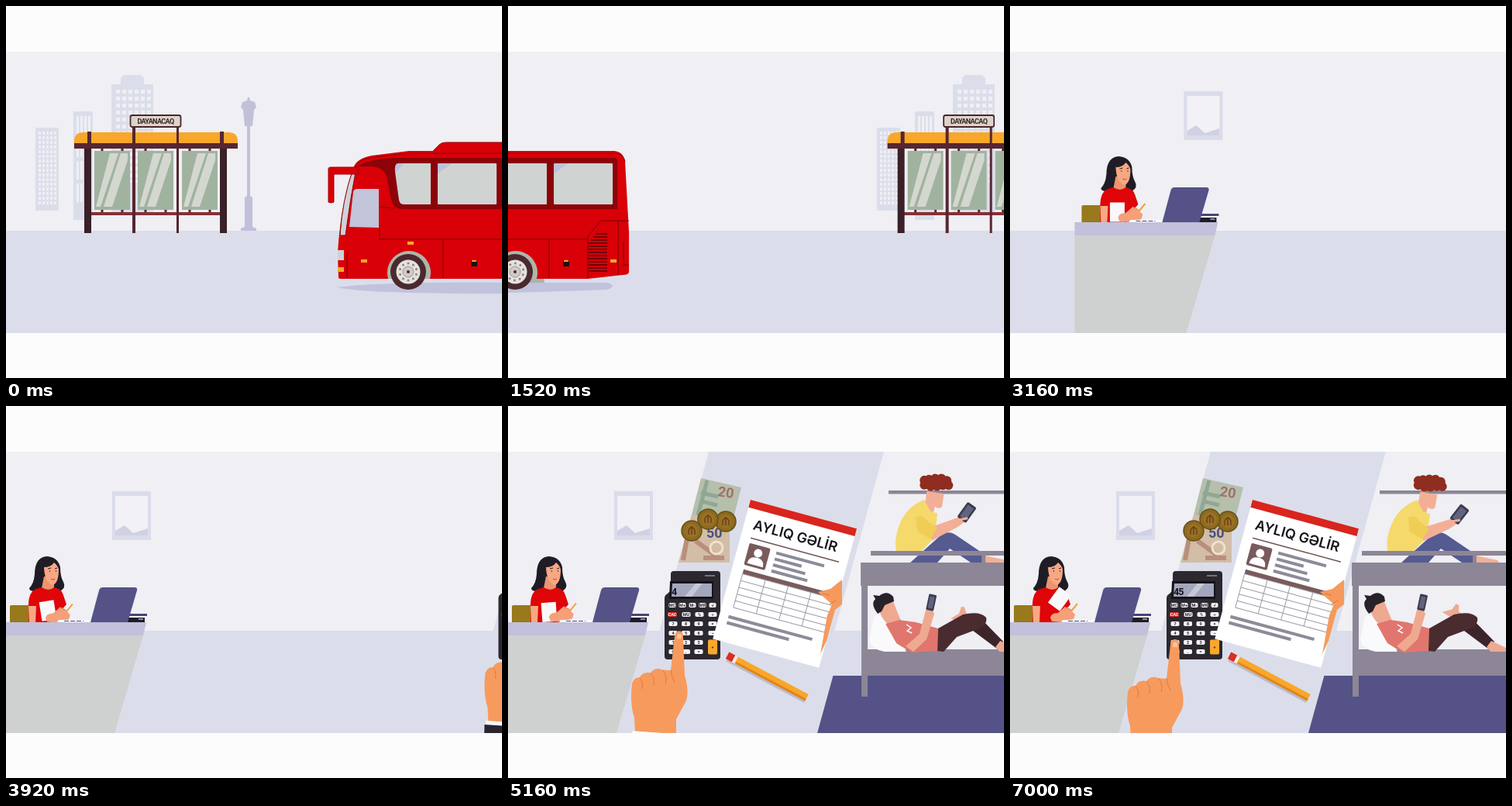
These frames come from a looping animation (640x480 px, 7040 ms). An HTML page:

```html
<!DOCTYPE html>
<html lang="az">
<head>
<meta charset="utf-8">
<style>
html, body { margin: 0; width: 100%; height: 100%; overflow: hidden; background: #fcfcfc; }
svg { display: block; width: 640px; height: 480px; }
text { font-family: Roboto, "Liberation Sans", sans-serif; font-weight: 700; }
</style>
</head>
<body>
<svg viewBox="0 0 640 480" xmlns="http://www.w3.org/2000/svg">
  <defs>
    <clipPath id="stage"><rect y="59" width="640" height="363"/></clipPath>
    <clipPath id="aboveSill"><rect y="300" width="640" height="52"/></clipPath>
    <pattern id="dots" x="42" y="162" width="5" height="6" patternUnits="userSpaceOnUse"><rect width="3" height="4" fill="#efeff4"/></pattern>
    <pattern id="panes" x="142" y="108" width="8" height="9" patternUnits="userSpaceOnUse"><rect width="5" height="5" fill="#efeff4"/></pattern>
    <pattern id="slits" x="91" y="142" width="5" height="29" patternUnits="userSpaceOnUse"><rect width="3" height="24" fill="#efeff4"/></pattern>
    <linearGradient id="glass" x2="1" y2="1"><stop offset=".12" stop-color="#bfc1da"/><stop offset=".13" stop-color="#cfd3d2"/></linearGradient>
  </defs>

  <g clip-path="url(#stage)">
    <rect y="59" width="640" height="231" fill="#efeff4"/>
    <rect y="290" width="640" height="132" fill="#dbdeea"/>

    <g id="street">
      <g id="city" fill="#dbdeea">
        <path d="M38 157h30v107h-30zM87 136h25v140h-25zM136 101h12v-8l4-4h22l4 4v8h12v165h-54z"/>
        <rect x="42" y="162" width="23" height="96" fill="url(#dots)"/>
        <rect x="91" y="142" width="18" height="112" fill="url(#slits)"/>
        <rect x="142" y="108" width="45" height="120" fill="url(#panes)"/>
      </g>
      <g id="stop">
        <g id="panels"></g>
        <path d="M108 266h170v4h-170z" fill="#853036"/>
        <path d="M88 179v-6q1-10 11-10h189q10 0 11 10v6z" fill="#f9a72b"/>
        <path d="M88 177h211v7h-211zM105 162h5v18h-5zM276 162h5v18h-5zM163 157h4v136h-4zM220 157h3v136h-3z" fill="#572630"/>
        <path d="M101 184h9v109h-9zM276 184h9v109h-9z" fill="#3a2028"/>
        <rect x="160.500" y="141" width="65" height="15" rx="2.500" fill="#dbd4c8" stroke="#4c252d" stroke-width="1.800"/>
        <text x="193" y="152" font-size="9" letter-spacing="-.6" text-anchor="middle" fill="#3a2028">DAYANACAQ</text>
      </g>
      <path id="lamp" fill="#c0c0da" d="M311 122l1-4h2l1 4 6 2 2 7-3 3-2 21h-3v90l3 2v38l5 2v3h-20v-3l5-2v-38l3-2v-90h-3l-2-21-3-3 2-7z"/>
      <g id="bus">
        <path d="M52 363Q110 355 300 357H505Q519 361 505 366Q310 374 150 370Q70 368 52 363Z" fill="#c1c2dc"/>
        <path d="M394 357h30l-3-15h-30z" fill="#aab3aa"/>
        <path d="M175 188l9-9q3-3 9-3h92q5 0 7 4l3 8z" fill="#d90007" stroke="#8b0409"/>
        <path d="M54 350L53 318Q57 255 73 209Q78 196 97 193L145 187H514Q526 188 528 201L533 292V343Q533 347 525 347L480 352H58Q54 352 54 350Z" fill="#d90007"/>
        <path d="M75 207Q82 197 100 195L145 190H515Q526 190 528 201" fill="none" stroke="#8b0409"/>
        <path d="M78 207Q95 196 135 196H514Q518 196 518 200V262H137Q125 262 122 250L116 220Q113 209 98 207Z" fill="#8b0409"/>
        <path d="M107 259l20 2" stroke="#8b0409"/>
        <path d="M131 203h42v53h-35q-5 0-6-6l-5-36q-1-11 4-11z" fill="url(#glass)"/>
        <g id="windows"></g>
        <path d="M56 296Q59 250 72 213L77 209Q69 250 63 296Z" fill="#cfd2d8" stroke="#8b0409"/>
        <path d="M68 285l5-45q1-4 5-4h28v50z" fill="#c3c5da"/>
        <path d="M41 210q0-2 3-2h36v9H48v36q-4 2-7 0z" fill="#d90007" stroke="#a30308"/>
        <path d="M107 288v13H480V297L497 277H533M65 318V351M189 301V351M269 301V351M349 301V351M430 301V351M480 301V351M519 277V347M526 305V334H533" fill="none" stroke="#700407"/>
        <path id="grille" stroke="#700407" stroke-width="2"/>
        <path d="M53 315h8v13h-8z" fill="#cfd2d8"/>
        <path d="M53 337h8v6h-8zM143 304h8v4h-8zM83 327h8v4h-8zM509 327h8v4h-8z" fill="#f9a72b"/>
        <path d="M225 328h8v8h-8zM305 328h8v8h-8zM448 328h8v8h-8z" fill="#1c1012"/>
        <path d="M226 328h6v2h-6zM306 328h6v2h-6zM449 328h6v2h-6z" fill="#f9a72b"/>
        <g id="wheels"></g>
      </g>
    </g>

    <g id="office">
      <path d="M224 110h50v63h-50z" fill="#dbdcea"/>
      <path d="M228 116h42v51h-42z" fill="#f1f1f6"/>
      <path d="M228 161l12-7 11 10 19-6v9h-42z" fill="#d0d1e4"/>
      <rect x="92" y="257" width="25" height="26" rx="2" fill="#98791b"/>
      <path d="M117 235Q123 229 124 217Q124 195 140 194Q154 195 157 208Q157 220 161 227Q165 234 157 239H124Q117 239 117 235Z" fill="#201c25"/>
      <path d="M136 220h13v14l-6 6-10-5z" fill="#ec946d"/>
      <path d="M136 208q9 0 13-6 5 4 6 9 0 18-8 20-10-3-11-23z" fill="#f8a783"/>
      <path d="M141 210l4-1M150 210l3-1" stroke="#201c25"/>
      <path d="M143 213h1M151 213h1" stroke="#201c25" stroke-width="1.600"/>
      <path d="M145 223q3 2 5 0" stroke="#d33932" fill="none"/>
      <path d="M116 262Q115 240 126 236l7-2q9 6 16 0 10 2 12 10l4 12-8 9v15h-41z" fill="#df0509"/>
      <path d="M116 258h10l-1 22h-8z" fill="#f8a783"/>
      <rect id="note" x="-9.500" y="-12.500" width="19" height="25" fill="#f8f8fb"/>
      <g id="pen">
        <path d="M160 272l14-17" stroke="#f3a03d" stroke-width="2"/>
        <path d="M139 273q1-6 10-6l9-8q6 2 8 5l5 5-2 6-16 4-12-1z" fill="#f5a078"/>
        <path d="M158 260l8 3" stroke="#dc805c"/>
      </g>
      <path d="M155 276h42v3h-44z" fill="#fff"/>
      <path d="M162 277.500h25" stroke="#44426d" stroke-dasharray="6 2"/>
      <path d="M245 268h24v3h-24z" fill="#47457a"/>
      <path d="M240 273h26v6h-26z" fill="#1f1c29"/>
      <path d="M247 272h21M258 275h6" stroke="#fff"/>
      <path d="M196 279l11-41q1-4 5-4h41q4 0 3 4l-12 41z" fill="#555287"/>
      <path d="M83 279h185l-4 17H83z" fill="#c2c0db"/>
      <path d="M83 296h181l-37 126H83z" fill="#ced1cf"/>
    </g>

    <g id="income">
      <path d="M259 59H485L385 422H159Z" fill="#dbdeea"/>
      <g id="money">
        <path d="M249 93l52 12-12 47-52-11z" fill="#b5bfac"/>
        <path d="M257 96l-12 45M249 112l22 5M250 123l20 5" stroke="#8fa894" stroke-width="5"/>
        <text transform="translate(270 116) rotate(9)" font-size="18" fill="#a36e67">20</text>
        <path d="M237 140l49 14v48h-66z" fill="#d2bda7"/>
        <path d="M232 165l-6 34M242 174l30 22M252 196h27" stroke="#b98f7b" stroke-width="6"/>
        <circle cx="269" cy="183" r="8" fill="none" stroke="#efe2cc" stroke-width="3"/>
        <text x="256" y="170" font-size="18" fill="#4b527f">50</text>
        <g id="coins"></g>
      </g>
      <path d="M214 213h56q4 0 4 4v106q0 4-4 4h-64q-4 0-4-4v-75q0-4 4-6l4-4v-21q0-4 4-4z" fill="#2c2830"/>
      <path d="M209 226h56v23h-57z" fill="#151319"/>
      <path d="M212 229h51v17h-52z" fill="#a3a7bd"/>
      <path d="M242 229h9l-14 17h-9z" fill="#c5c8d6"/>
      <path d="M254 219h13" stroke="#77727b" stroke-width="2"/>
      <text id="digits" x="211" y="244" font-size="12.500" letter-spacing="-1" fill="#17151c"></text>
      <g id="keys"></g>

      <g transform="translate(313 121) rotate(15.2)">
        <rect width="142" height="186" fill="#fff"/>
        <rect width="142" height="10" fill="#d8251d"/>
        <text x="12" y="36" font-size="18" style="font-family:Inter,sans-serif;font-weight:600" fill="#17151c">AYLIQ GƏLİR</text>
        <path d="M13 47.500h118" stroke="#725659" stroke-width="1.600"/>
        <rect x="13.500" y="54" width="28" height="29" rx="2" fill="#795b5c"/>
        <circle cx="27.500" cy="64" r="5.500" fill="#fff"/>
        <path d="M17 80q0-10 10.500-10T38 80z" fill="#fff"/>
        <path d="M50 57.500h64M50 65.500h36M50 73.500h43M50 81.500h48M12 153h112M12 161h83" stroke="#8d8b99" stroke-width="4"/>
        <path d="M15 89h122v6H15z" fill="#795b5c"/>
        <path id="table" fill="none" stroke="#9b9ba9"/>
      </g>
      <path d="M400 240l16-4 15-12v32l-9 7-11 40-8 17 9-50 6-14-9-8z" fill="#f59a5c"/>
      <path d="M406 242l9 2M415 256l8-5" stroke="#d9783f"/>
      <g transform="translate(285 322.500) rotate(28)">
        <path d="M0 4h114v4H0z" fill="#b9bccf"/>
        <path d="M0-4.500h114v9.500H0z" fill="#f9a72b"/>
        <path d="M12 2h102v3H12z" fill="#df861d"/>
        <path d="M-2-4.500h9v9.500h-9z" fill="#dc2b23"/>
        <path d="M7-4.500h4v9.500h-4z" fill="#f1eeee"/>
      </g>
      <g id="hand">
        <path d="M-6 5Q-5-2 0-2Q5-2 5 5L7 55Q13 75 9 88L-4 112V130H-57L-58 110Q-64 92-61 66Q-58 57-51 58Q-47 50-37 52Q-31 44-22 48L-11 49Z" fill="#f79a5e"/>
        <path d="M-51 59q5 5 3 14M-37 53q6 5 4 15M-21 49q6 8 3 17M-11 48q1 10 5 16" fill="none" stroke="#dd7b40"/>
        <path d="M-3 3q3-3 6 0v5h-6z" fill="#fac39c"/>
        <path d="M-60 127l57 4v6l-58-4z" fill="#fff"/>
        <path d="M-62 132l59 4v50h-60z" fill="#292630"/>
      </g>
    </g>

    <g id="dorm">
      <path d="M485 59H900V290H421.400Z" fill="#efeff4"/>
      <path d="M421.400 290H900V348H405.400Z" fill="#dbdeea"/>
      <path d="M442 232h435v84H442z" fill="#efeff4"/>
      <path d="M405.400 348H900V422H385Z" fill="#555287"/>
      <path d="M477 109h400v4.500H477z" fill="#8c8696"/>
      <path d="M505 202l39-35q11-8 22 1l34 23v11h-17l-27-18-16 18z" fill="#555a91"/>
      <path d="M601 193l28 6q4 3-1 4h-28z" fill="#f3af96"/>
      <g id="reader">
        <path d="M528 110l22 4-3 17q-6 3-9-1l-3 11-12-4z" fill="#f3af96"/>
        <path d="M524 121Q501 130 492 152Q483 174 488 191l27 1 22-22 4-31-9-3z" fill="#f5d96b"/>
        <path d="M531 157l36-12 8-3 6 5-14 10-34 17z" fill="#f3af96"/>
        <path d="M513 144q8-5 13 3l14 11-8 14-17-10z" fill="#f0cd55"/>
        <g transform="translate(579 138.500) rotate(37)">
          <rect x="-7" y="-12" width="14" height="24" rx="2" fill="#3c3b50"/>
          <rect x="-4.500" y="-9" width="9" height="18" fill="#62647d"/>
        </g>
        <path d="M568 148l12-2" stroke="#f3af96" stroke-width="3"/>
        <path id="curls" fill="#8e2d20"/>
      </g>
      <path d="M454 187h423v6H454zM441 202h436v30H441zM442 202h8v173h-8zM442 314h435v34H442zM597 187h5v16h-5z" fill="#8c8696"/>
      <path d="M458 272q4-4 9 0l25 30 8 15h-28q-17-3-20-15z" fill="#fafafd"/>
      <g transform="translate(3 1)">
        <path d="M461 260l18-11 6 15 5 12-14 6q-10-5-15-22z" fill="#eeaa90"/>
        <path d="M460 267q-10-13-3-19l-3-5 8 1q10-8 18 1l1 6-12 5-4 8z" fill="#27222a"/>
      </g>
      <path d="M473 281l18-5 21 3 29 8v29l-35 2-19-12z" fill="#e1766e"/>
      <path d="M500 282l6 4-5 4 6 3" fill="none" stroke="#fff" stroke-width="1.500"/>
      <path d="M499 310l18-16 8-31 7-2 4 7-10 33-17 16z" fill="#eeaa90"/>
      <g transform="translate(532 254) rotate(12)">
        <rect x="-5" y="-11" width="10" height="21" rx="1.500" fill="#3c3b50"/>
        <rect x="-3" y="-8" width="6" height="15" fill="#62647d"/>
      </g>
      <path d="M576 270l14-2 35 36-7 10-44-33z" fill="#3c242b"/>
      <path d="M621 303l19 9v5h-20l-5-6z" fill="#eeaa90"/>
      <path id="foot" d="M557 270l12-5 4-8 4 1 1 8 5 3-3 7-14-2z" fill="#eeaa90"/>
      <path d="M541 287l32-18q22-5 30 4 2 11-14 16l-24 9-17 19-8-1z" fill="#4a2b30"/>
    </g>
  </g>
</svg>
<script>
const LOOP = 7040;
const $ = id => document.getElementById(id);
const range = n => [...Array(n).keys()];
const repeat = (items, make) => items.map(make).join('');
const place = (id, x, y = 0, turn = 0) =>
  $(id).setAttribute('transform', `translate(${x.toFixed(2)} ${y.toFixed(2)}) rotate(${turn.toFixed(2)})`);
const clamp = v => Math.max(0, Math.min(1, v));
const smooth = v => v * v * (3 - 2 * v);

// Slides in from the right and settles at zero.
const slideIn = (t, from, start, end) => from * (1 - clamp((t - start) / (end - start))) ** 2;

// Each key is [time, ...values]; values ease between neighbours.
function track(keys, t) {
  let i = keys.findIndex(k => k[0] > t);
  if (i === 0) return keys[0].slice(1);
  if (i < 0) return keys[keys.length - 1].slice(1);
  const a = keys[i - 1], b = keys[i];
  const p = smooth((t - a[0]) / (b[0] - a[0]));
  return a.slice(1).map((v, n) => v + (b[n + 1] - v) * p);
}

function build() {
  $('panels').innerHTML = repeat([114, 170, 227], x => `
    <path d="M${x + 10} 183v84M${x + 36} 183v84" stroke="#572630" stroke-width="3"/>
    <rect x="${x}" y="187" width="46" height="76" fill="#a0b39f"/>
    <path d="M${x + 20} 190h11l-23 69h-6zM${x + 34} 190h9v9l-20 60h-11z" fill="#d4d7cf"/>`);
  $('windows').innerHTML = repeat([182, 267, 351, 436], x =>
    `<rect x="${x}" y="203" width="76" height="53" rx="1" fill="url(#glass)"/>`);
  $('grille').setAttribute('d', repeat(range(13), i => `M${Math.max(481, 490 - i * 3)} ${294 + i * 4}H505`));
  $('wheels').innerHTML = repeat([144, 386], x => `
    <circle cx="${x + 1}" cy="344" r="28" fill="#aeb5aa" clip-path="url(#aboveSill)"/>
    <circle cx="${x}" cy="343" r="23" fill="#4a2a2e"/>
    <circle cx="${x}" cy="343" r="15.500" fill="#e5e2dd"/>
    <g class="rim">${repeat(range(10), i =>
      `<circle cx="${x}" cy="332" r="1.500" fill="#8d8180" transform="rotate(${i * 36} ${x} 343)"/>`)}</g>
    <circle cx="${x}" cy="343" r="7" fill="#d0cbc7" stroke="#9f9694"/>
    <circle cx="${x}" cy="343" r="2" fill="#4a2a2e"/>`);
  $('coins').innerHTML = repeat([[237, 161], [281, 149], [258, 146]], ([x, y]) => `
    <circle cx="${x}" cy="${y}" r="13" fill="#8c6b1d" stroke="#65501b" stroke-width="1.500"/>
    <circle cx="${x}" cy="${y}" r="9" fill="#9a7025"/>
    <path d="M${x - 4} ${y + 5}v-6q4-7 8 0v6M${x} ${y - 6}v11" fill="none" stroke="#6c4119" stroke-width="1.500"/>`);

  const key = (x, y, label, w = 11, fill = '#f4f3f5', ink = '#2c2830', h = 6) => `
    <rect x="${x - w / 2}" y="${y - h / 2}" width="${w}" height="${h}" rx="1.800" fill="${fill}"/>
    <text x="${x}" y="${y + 2}" font-size="5.500" text-anchor="middle" fill="${ink}">${label}</text>`;
  const rows = ['789', '456', '123', '0.='];
  $('keys').innerHTML =
    repeat(['MC', 'M+', 'M-', 'MR', '√'], (s, i) => key(212 + i * 13, 257, s, 9)) +
    key(212, 269, 'CAC', 12, '#dc2720', '#fff') +
    repeat(['MU', '%', '÷'], (s, i) => key(230 + i * 17, 269, s)) +
    repeat(rows, (row, r) => repeat([...row], (s, i) => key(213 + i * 16.500, 281 + r * 12, s))) +
    key(264, 281, '×') + key(264, 293, '−') + key(264, 311, '+', 12, '#f9a72b', '#2c2830', 19);
  $('table').setAttribute('d',
    repeat(range(6), i => `M15 ${95 + i * 9}h122`) + repeat(range(5), i => `M${15 + i * 30.500} 95v45`) + 'M137 95v45');
  const curls = [[525, 102], [525, 96], [531, 95], [539, 94], [547, 94], [554, 97], [556, 103], [533, 104], [541, 104], [549, 103]];
  $('curls').setAttribute('d', repeat(curls, ([x, y]) => `M${x - 6} ${y}a6 6 0 1 0 12 0a6 6 0 1 0-12 0`));
}

const finger = [
  [4400, 246, 279], [4850, 214, 294], [5000, 214, 291], [5350, 230, 294], [5500, 230, 291],
  [6080, 242, 290], [6500, 246, 294], [7000, 213, 303]
];
const paper = [
  [3200, 138, 266, 0], [3900, 141, 264, -9], [4320, 141, 265, -12], [5100, 140, 266, -4],
  [6080, 142, 264, -10], [6500, 141, 264, -8], [7000, 151, 249, 36]
];

function draw(t) {
  const u = t / 760;
  const pan = 160.4 * u + 61.9 * u * u - 16.3 * u ** 3;
  const ride = 375 - 0.4947 * t;
  $('street').style.display = t < 2400 ? '' : 'none';
  place('city', pan);
  place('stop', pan * 0.917);
  place('lamp', pan * 0.777);
  place('bus', ride);
  document.querySelectorAll('.rim').forEach((rim, i) =>
    rim.setAttribute('transform', `rotate(${(-t * 1.23) % 360} ${i ? 386 : 144} 343)`));

  place('office', slideIn(t, 644, 2440, 3580) - 87);
  place('note', ...track(paper, t));
  const writing = t > 6500 ? 0 : Math.sin((t - 3160) / 150);
  place('pen', writing * 1.2, writing * -0.6);

  place('income', slideIn(t, 490, 3880, 4552));
  place('hand', ...track(finger, t));
  $('digits').textContent = t < 4900 ? '' : t < 5400 ? '4' : '45';

  place('dorm', slideIn(t, 262, 4630, 5320));
  const lean = Math.sin((t - 6080) / 586);
  $('reader').setAttribute('transform', `rotate(${lean * 1.1} 515 192)`);
  $('foot').setAttribute('transform', `rotate(${lean * 9} 585 272)`);
}

build();
const start = performance.now();
function frame() {
  const t = (performance.now() - start) % LOOP;
  draw(Math.floor(t / 40) * 40);
  requestAnimationFrame(frame);
}
draw(0);
requestAnimationFrame(frame);
</script>
</body>
</html>
```
